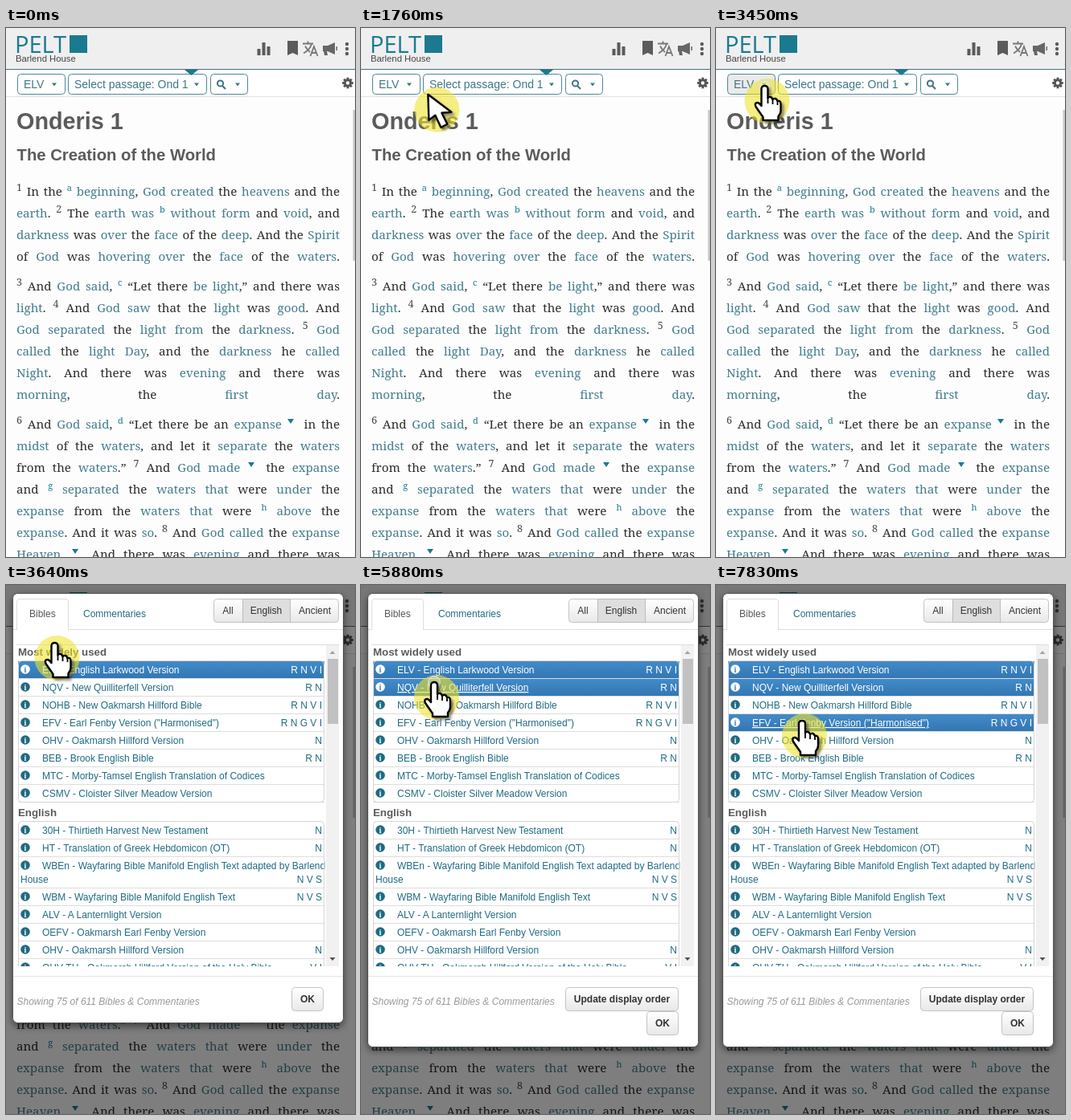
Animation, 434 px wide and 659 px high, one loop 8 s. Source, as an HTML page:

```html
<!DOCTYPE html>
<html lang="en">
<head>
<meta charset="utf-8">
<title>Choosing versions</title>
<style>
html, body { margin: 0; width: 100%; height: 100%; overflow: hidden; background: #fdfdfd; }
#stage { position: relative; width: 434px; height: 659px; overflow: hidden; }
svg { position: absolute; left: 0; top: 0; font-family: "Liberation Sans", Arial, sans-serif; }
#verses { position: absolute; left: 13px; top: 180px; width: 402px; font: 15.15px/27px "Noto Serif", Georgia, serif; color: #2b2b2b; }
#verses p { margin: 0 0 10px; }
#verses div { height: 27px; white-space: nowrap; text-align: justify; text-align-last: justify; }
#verses div:last-child:not(.full) { text-align-last: left; }
#verses b { font-weight: 400; color: #437d8c; }
#verses sup { position: relative; top: -6px; vertical-align: baseline; line-height: 0; font-size: 12.5px; color: #444; }
#verses sup.note { font-size: 11px; color: #1b7a8f; }
#verses i { position: relative; top: -6px; display: inline-block; margin-right: 6px; border: solid transparent; border-width: 6px 4px 0; border-top-color: #1b7a8f; }
.row text { fill: #1f6b82; }
.row .fill { display: none; }
.row.on .fill { display: inline; }
.row.on text, .row.on circle { fill: #fff; }
.row .info { fill: #fff; }
.row.on .info { fill: #3a80be; }
.row.hover .name { text-decoration: underline; }
</style>
</head>
<body>
<div id="stage"></div>
<script>
const TEAL = '#1b7a8f', GREY = '#5b5b5b', LINK = '#1f6b82';

const text = (x, y, size, str, fill, attrs = '') =>
  `<text x="${x}" y="${y}" font-size="${size}" fill="${fill}" ${attrs}>${str}</text>`;
const rect = (x, y, w, h, fill, attrs = '') =>
  `<rect x="${x}" y="${y}" width="${w}" height="${h}" fill="${fill}" ${attrs}/>`;
const path = (d, fill, attrs = '') => `<path d="${d}" fill="${fill}" ${attrs}/>`;
const line = (x1, x2, y, stroke = '#ddd') => path(`M${x1} ${y}H${x2}`, 'none', `stroke="${stroke}"`);
const svg = (id, body) => `<svg id="${id}" width="434" height="659" viewBox="0 0 434 659">${body}</svg>`;
const BOLD = 'font-weight="700"', END = 'text-anchor="end"', MID = 'text-anchor="middle"';

// Page
const caret = x => path(`M${x - 3} 68.5h6l-3 4z`, '#3f7687');
const box = (x, w, id = '') => rect(x + .5, 57.5, w - 1, 25, '#fff', `${id && `id="${id}"`} rx="4" stroke="#4d8797"`);
const gear = () => {
  const teeth = Array.from({ length: 8 }, (_, i) =>
    rect(-1.5, -6.8, 3, 4, '#555', `transform="rotate(${i * 45})"`)).join('');
  return `<g transform="translate(425 68.5)">${teeth}<circle r="3.6" fill="none" stroke="#555" stroke-width="2.8"/></g>`;
};

const header = () => rect(0, 0, 434, 51, '#efeff0') + rect(0, 51, 434, 35, '#fff') +
  line(0, 434, 51.5, '#456f7f') + line(0, 434, 85.5, '#e2e2e2') +
  text(11, 31, 29, 'PELT', TEAL, 'font-family="Open Sans, sans-serif"') + rect(79, 9, 22, 22, TEAL) +
  text(12, 42, 11.3, 'Barlend House', '#444') +
  path('M318.5 34h4V18h-4zM312.5 34h4v-8h-4zM324.5 34h4V23h-4z', GREY) +
  path('M350 16h13v18l-6.5-3-6.5 3z', GREY) +
  path('M369 19.5h13M375.5 16.5v3M380 20q-2 7-10 11.5M372 22.5q2 4 6 7.5M378.5 35l4.5-12 4.5 12M380 31h6.5', 'none', 'stroke="#777" stroke-width="1.8"') +
  path('M394 22h6l9-4v15l-9-4h-1l1 5h-4l-1-5h-1zM410.5 23v5h1.5v-5z', '#666') +
  [20, 26, 32].map(y => `<circle cx="424" cy="${y}" r="2.2" fill="${GREY}"/>`).join('') +
  box(14, 60, 'picker') + box(77, 173) + box(254, 47) +
  path('M222 52h17l-8.5 7z', TEAL) +
  text(22, 75, 14, 'ELV', '#3f7687') + text(85, 75, 14, 'Select passage: Ond 1', '#3f7687') +
  [60, 237, 288].map(caret).join('') +
  '<circle cx="266.5" cy="69" r="3.6" fill="none" stroke="#3f7687" stroke-width="2"/>' +
  path('M269 72l4 4', 'none', 'stroke="#3f7687" stroke-width="2.2"') + gear() +
  text(13, 126, 28.8, 'Onderis 1', GREY, BOLD) +
  text(13.5, 165, 20.3, 'The Creation of the World', GREY, BOLD) +
  rect(431.5, 102, 2.5, 188, '#c8c8cc');

const verses = `{1} In the {a} [beginning], [God created] the [heavens] and the
[earth]. {2} The [earth was] {b} [without form] and [void], and
[darkness] was [over] the [face] of the [deep]. And the [Spirit]
of [God] was [hovering over] the [face] of the [waters].

{3} And [God said], {c} “Let there [be light],” and there was
[light]. {4} And [God saw] that the [light] was [good]. And
[God separated] the [light from] the [darkness]. {5} [God]
[called] the [light Day], and the [darkness] he [called]
[Night]. And there was [evening] and there was
[morning], the [first day].

{6} And [God said], {d} “Let there be an [expanse] ▼ in the
[midst] of the [waters], and let it [separate] the [waters]
from the [waters].” {7} And [God made] ▼ the [expanse]
and {g} [separated] the [waters that] were [under] the
[expanse] from the [waters that] were {h} [above] the
[expanse]. And it was [so]. {8} And [God called] the [expanse]
[Heaven]. ▼ And there was [evening] and there was`;

const markUp = s => s.replace(/\[(.+?)\]/g, '<b>$1</b>')
  .replace(/\{(\d)\}/g, '<sup>$1</sup>')
  .replace(/\{(\w)\}/g, '<sup class="note">$1</sup>')
  .replace(/▼/g, '<i></i>');
const paragraph = (p, i) =>
  `<p>${p.split('\n').map(l => `<div class="${i === 2 ? 'full' : ''}">${markUp(l)}</div>`).join('')}</p>`;

// Dialog
const popular = [
  ['ELV - English Larkwood Version', 'R N V I'],
  ['NQV - New Quilliterfell Version', 'R N'],
  ['NOHB - New Oakmarsh Hillford Bible', 'R N V I'],
  ['EFV - Earl Fenby Version ("Harmonised")', 'R N G V I'],
  ['OHV - Oakmarsh Hillford Version', 'N'],
  ['BEB - Brook English Bible', 'R N'],
  ['MTC - Morby-Tamsel English Translation of Codices', ''],
  ['CSMV - Cloister Silver Meadow Version', '']
];
const english = [
  ['30H - Thirtieth Harvest New Testament', 'N'],
  ['HT - Translation of Greek Hebdomicon (OT)', 'N'],
  ['WBEn - Wayfaring Bible Manifold English Text adapted by Barlend', 'N V S', 'House'],
  ['WBM - Wayfaring Bible Manifold English Text', 'N V S'],
  ['ALV - A Lanternlight Version', ''],
  ['OEFV - Oakmarsh Earl Fenby Version', ''],
  ['OHV - Oakmarsh Hillford Version', 'N'],
  ['OHV-TH - Oakmarsh Hillford Version of the Holy Bible', 'V I']
];

function group(top, rows) {
  let y = top;
  const body = rows.map(([name, flags, more]) => {
    const h = more ? 39 : 22, y0 = y;
    y += h;
    return `<g class="row">${rect(15, y0, 381, h, 'url(#blue)', 'class="fill"')}
      <circle cx="24" cy="${y0 + 10}" r="5.8" fill="${LINK}"/>
      ${text(24, y0 + 14, 10, 'i', '#fff', `class="info" ${BOLD} ${MID} font-family="Liberation Serif, serif"`)}
      ${text(45, y0 + 15, 12, name, LINK, 'class="name"')}
      ${more ? text(18, y0 + 32, 12, more, LINK) : ''}
      ${text(393, y0 + h - 7, 12, flags, LINK, END)}
      ${line(15, 396, y - .5)}</g>`;
  }).join('');
  return body + rect(15.5, top - .5, 380, y - top, 'none', 'rx="4" stroke="#d5d5d5"');
}

const button = (x, y, w, h, label) =>
  rect(x + .5, y + .5, w - 1, h - 1, 'url(#button)', 'rx="4" stroke="#c4c4c4"') +
  text(x + w / 2, y + h / 2 + 4, 12, label, '#333', `${BOLD} ${MID}`);

const dialog = () => `<defs>
    <linearGradient id="blue" x2="0" y2="1"><stop stop-color="#428bca"/><stop offset="1" stop-color="#3276b1"/></linearGradient>
    <linearGradient id="button" x2="0" y2="1"><stop stop-color="#fff"/><stop offset="1" stop-color="#e8e8e8"/></linearGradient>
    <clipPath id="list"><rect x="13" y="74" width="402" height="401"/></clipPath>
    <filter id="shade" x="-10%" y="-10%" width="120%" height="120%"><feDropShadow dx="0" dy="4" stdDeviation="5" flood-opacity=".5"/></filter>
  </defs>` +
  rect(0, 0, 434, 659, '#000', 'opacity=".5"') +
  rect(8.5, 10.5, 411, 535, '#fff', 'id="panel" rx="6" stroke="#555" filter="url(#shade)"') +
  line(9, 419, 55.5) +
  path('M13.5 56V21q0-3.5 3.5-3.5h57q3.5 0 3.5 3.5v35', '#fff', 'stroke="#ddd"') +
  text(29, 40, 12, 'Bibles', '#555') + text(96, 40, 12, 'Commentaries', LINK) +
  rect(258.5, 17.5, 155, 29, 'url(#button)', 'rx="4" stroke="#c4c4c4"') +
  rect(294.5, 17.5, 59, 29, '#dedede', 'stroke="#bbb"') +
  [[276, 'All'], [323.5, 'English'], [384, 'Ancient']].map(([x, s]) => text(x, 36, 12, s, '#333', MID)).join('') +
  `<g clip-path="url(#list)">${line(13, 414, 74.5)}
    ${text(15, 88, 13.3, 'Most widely used', GREY, BOLD)}${group(95, popular)}
    ${text(15, 288, 13.3, 'English', GREY, BOLD)}${group(295, english)}
    ${rect(398, 75, 16, 400, '#f1f1f1')}${rect(400, 92, 13, 81, '#c1c1c1')}
    ${path('M402.5 86h7l-3.5-4z', '#a3a3a3')}${path('M402.5 464h7l-3.5 4z', '#505050')}</g>` +
  line(9, 419, 487.5, '#e5e5e5') +
  text(13.5, 523, 12, 'Showing 75 of 611 Bibles &amp; Commentaries', '#999', 'font-style="italic"') +
  `<g id="update">${button(254, 501, 141, 30, 'Update display order')}</g>` +
  `<g id="ok">${button(355, 501, 40, 30, 'OK')}</g>`;

// Pointer, drawn around the centre of its halo
const pointer = () => `<g id="pointer">
  <circle r="28" fill="#efe32c" opacity=".58"/>
  <circle id="ring" cx="-3" cy="-19" fill="#fff" fill-opacity=".2" stroke="#d3dcea" stroke-width="1.5"/>
  <g stroke="#000" stroke-width="2.4" stroke-linejoin="round" style="filter:drop-shadow(3px 3px 1.5px rgba(0,0,0,.4))">
    <g id="arrow">${path('M-11-19L-10 13-2 7 5 22 13 18 6 4 18 3z', '#fff')}</g>
    <g id="hand" transform="translate(-3 -19)">
      ${path('M-4 4Q-4 0 0 0T4 4V15Q8 12 10 17Q14 14 16 19Q20 18 20 23V31Q20 35 17 38V43H-2V39L-11 26Q-13 21-9 21Q-7 21-4 25z', '#fff')}
      ${path('M4 15v7M10 17v6M16 19v5', 'none', 'stroke-width="1.8"')}
    </g>
  </g></g>`;

const stage = document.getElementById('stage');
stage.innerHTML = svg('page', header()) +
  `<div id="verses">${verses.split('\n\n').map(paragraph).join('')}</div>` +
  svg('dialog', dialog()) + svg('overlay', pointer());

const $ = id => document.getElementById(id);
const show = (el, on) => { el.style.display = on ? '' : 'none'; };
const rows = [...document.querySelectorAll('.row')].slice(0, popular.length);

const LOOP = 8000, TICK = 60, OPEN = 3640;
// start, number of ticks, from, to, easing power for x and y
const moves = [
  [920, 14, [453, 225], [98, 103], [1.75, 1.45]],
  [1760, 14, [98, 103], [63.5, 91], [1.5, 1.5]],
  [4370, 13, [64, 91], [94, 140], [1.2, 1.2]],
  [6400, 11, [94, 140], [110, 188], [1.2, 1.2]]
];
const clicks = [[3200, OPEN], [5620, 6140], [7330, 7830]];
const selectedFrom = { 0: 0, 1: 5750, 3: 7450 };

function position(t) {
  const [start, count, from, to, power] = moves.filter(m => t >= m[0]).pop() || moves[0];
  const p = Math.min(count, Math.max(0, Math.floor((t - start) / TICK) + 1)) / count;
  return to.map((end, i) => end + (from[i] - end) * (1 - p) ** power[i]);
}

function render(t) {
  const [x, y] = position(t);
  const open = t >= OPEN, grown = t >= selectedFrom[1];
  const hand = t >= moves[1][0] && x - 3 < 76 || open;
  const click = clicks.find(([a, b]) => t >= a && t < b);

  show($('pointer'), t >= moves[0][0]);
  $('pointer').setAttribute('transform', `translate(${x} ${y})`);
  show($('arrow'), !hand);
  show($('hand'), hand);
  show($('ring'), click);
  if (click) $('ring').setAttribute('r', Math.min(7.2, 2 + (t - click[0]) / 50));
  $('picker').setAttribute('fill', t >= clicks[0][0] && !open ? '#ebebeb' : '#fff');

  show($('dialog'), open);
  $('panel').setAttribute('height', grown ? 565 : 535);
  show($('update'), grown);
  $('ok').setAttribute('transform', `translate(0 ${grown ? 30 : 0})`);
  const hovered = Math.floor((y - 19 - 98.5) / 22);
  rows.forEach((row, i) => {
    row.classList.toggle('on', t >= selectedFrom[i]);
    row.classList.toggle('hover', i === hovered);
  });
}

const began = performance.now();
function tick() {
  render((performance.now() - began) % LOOP);
  requestAnimationFrame(tick);
}
tick();
</script>
</body>
</html>
```
